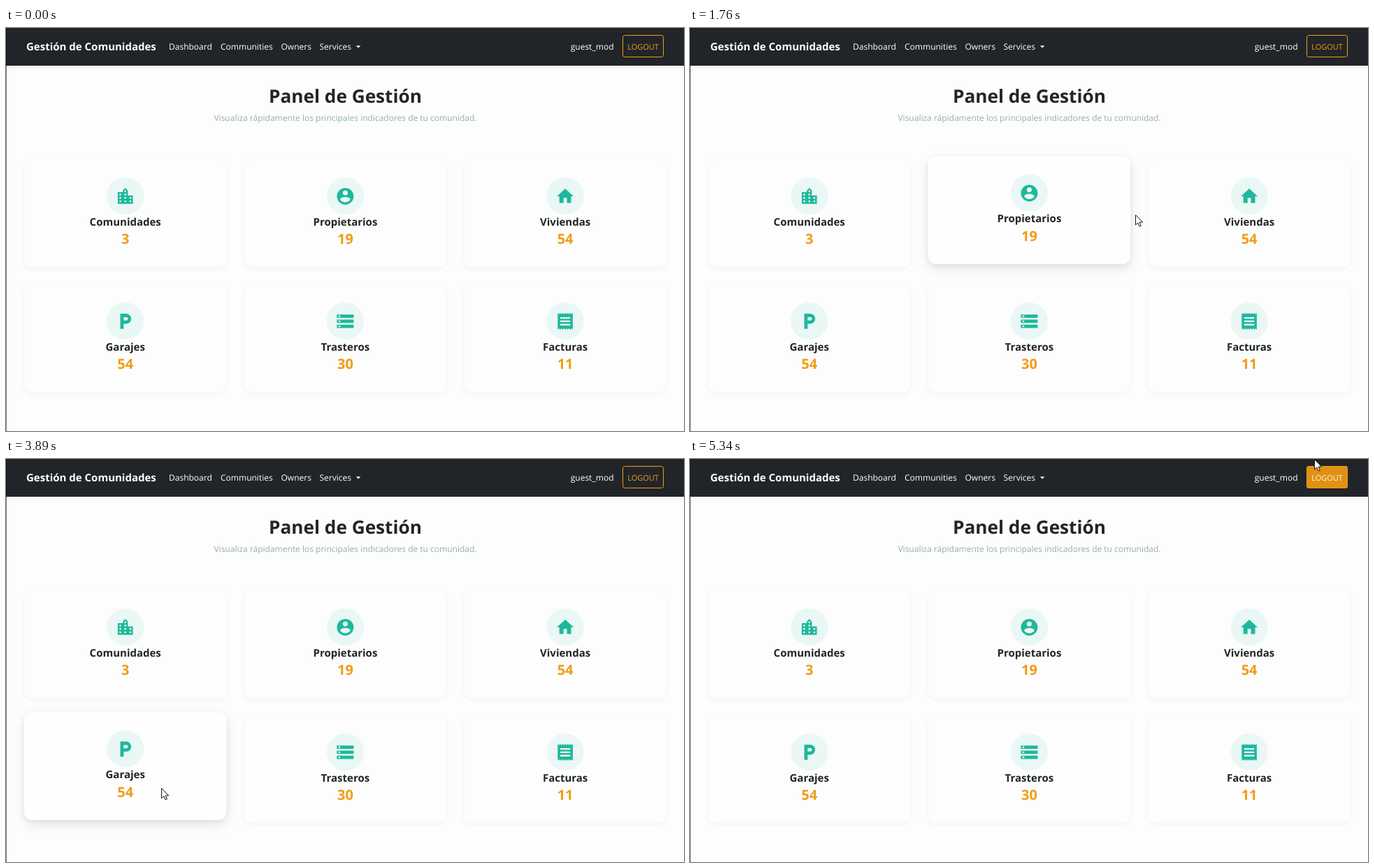
These frames come from a looping animation (970 px wide and 577 px high, 5.41 s). An HTML page:

```html
<!DOCTYPE html>
<html lang="es">
<head>
<meta charset="utf-8">
<title>Panel de Gestión</title>
<style>
  html, body { margin: 0; width: 100%; height: 100%; overflow: hidden; background: #fdfdfd; }
  svg { display: block; }
  text { font: 12px "Open Sans", "Noto Sans", sans-serif; text-rendering: geometricPrecision; }
  .nav { fill: #fff; }
  .bar { fill: #212529; filter: drop-shadow(0 1px 4px rgba(0,0,0,.1)); }
  .brand, .label { font-size: 15px; font-weight: 700; }
  .brand { fill: #fff; }
  .label, .title { fill: #212529; }
  .title { font-size: 26.2px; font-weight: 700; }
  .lead { fill: #95afb3; }
  .mid { text-anchor: middle; }
  .count { font-size: 20px; font-weight: 700; fill: #f19c16; }
  .logout { font-size: 11px; }
  .card { fill: #fdfdfd; filter: drop-shadow(0 2px 3px rgba(0,0,0,.045)); }
  .lift { fill: #fefefe; filter: drop-shadow(0 6px 8px rgba(0,0,0,.1)); }
  .disc { fill: #e9f7f5; }
  .icon { fill: #1fb89c; fill-rule: evenodd; }
  .pointer { fill: #fff; stroke: #111; stroke-linejoin: round; }
</style>
</head>
<body>
<svg width="970" height="577" viewBox="0 0 970 577">
  <rect width="970" height="577" fill="#fdfdfd"/>
  <rect class="bar" x="-10" y="-10" width="990" height="64"/>
  <rect width="1" height="54" fill="#111"/>
  <rect y="54" width="1" height="523" fill="#777"/>

  <text class="brand" x="29" y="32">Gestión de Comunidades</text>
  <g class="nav">
    <text x="233" y="31">Dashboard</text>
    <text x="307" y="31">Communities</text>
    <text x="393.5" y="31">Owners</text>
    <text x="448.5" y="31">Services</text>
    <path d="M500.8 25.2h6.6l-3.3 3.4z"/>
    <text x="869.5" y="31" text-anchor="end">guest_mod</text>
  </g>

  <rect x="882.5" y="10.5" width="58" height="31" rx="3" fill="none" stroke="#f39c12"/>
  <text class="logout mid" x="911.6" y="30.6" fill="#f39c12">LOGOUT</text>
  <g id="filled">
    <rect x="882" y="10" width="59" height="32" rx="3.5" fill="#f39c12"/>
    <text class="logout mid" x="911.6" y="30.6" fill="#fff">LOGOUT</text>
  </g>

  <text class="title mid" x="485.5" y="107">Panel de Gestión</text>
  <text class="lead mid" x="485.5" y="133">Visualiza rápidamente los principales indicadores de tu comunidad.</text>

  <g id="cards"></g>

  <g id="cursor">
    <path id="arrow" class="pointer" d="M.5 .7V15L3.8 11.9 6.1 17.1 8.3 16.1 6.1 11H10.6Z"/>
    <path id="hand" class="pointer" d="M0 1Q1.3-1 2.6 1V6L8.4 7.2Q10 7.6 9.9 9.2L9 16.5H1.2V14L-3.2 9.3Q-3.5 6-1.3 7.6L0 8.8Z"/>
    <path id="beam" class="pointer" d="M-3.5-7.5H-1L0-6.5 1-7.5H3.5M0-6.5V6.5M-3.5 7.5H-1L0 6.5 1 7.5H3.5" style="fill: none"/>
  </g>
</svg>
<script>
const LOOP = 5410, TICK = 70, FADE = 200, PAINT_LAG = 20, BUTTON = 6;
const $ = id => document.getElementById(id);

// icons on a 24-unit square
const box = (x, y, w, h) => `M${x} ${y}h${w}v${h}h${-w}z`;
const rows = (from, to, step, shape) => {
  let d = "";
  for (let y = from; y <= to; y += step) d += shape(y);
  return d;
};
const ring = (y, r) => `M12 ${y - r}a${r} ${r} 0 1 0 .01 0z`;
const city = "M15 11V5l-3-3-3 3v2H3v14h18V11z" +
  [9, 5, 13].map((top, i) => rows(top, 17, 4, y => box(5 + 6 * i, y, 2, 2))).join("");
const person = ring(12, 10) + ring(8, 3) + "M12 19.2Q8.2 19.1 6 16C6 12 18 12 18 16Q15.8 19.1 12 19.2z";
const house = "M10 20v-6h4v6h5v-8h3L12 3 2 12h3v8z";
const parking = "M13 3H6v18h4v-6h3a6 6 0 0 0 0-12zm.2 8H10V7h3.2a2 2 0 0 1 0 4z";
const storage = rows(4, 16, 6, y => box(2, y, 20, 4) + box(4, y + 1, 2, 2));
const receipt = "M3 22" + "l1.5-1.5 1.5 1.5".repeat(6) + "V2" + "l-1.5 1.5-1.5-1.5".repeat(6) + "z" +
  rows(7, 15, 4, y => box(6, y, 12, 2));

const CARDS = [
  ["Comunidades", 3, city], ["Propietarios", 19, person], ["Viviendas", 54, house],
  ["Garajes", 54, parking], ["Trasteros", 30, storage], ["Facturas", 11, receipt]
];

// time, x, y of the pointer at its turning points
const PATH = [
  [0, 240, 665], [790, 186, 372], [990, 181, 272], [1300, 260, 270], [1760, 637, 267],
  [2040, 800, 262], [2180, 764, 355], [2460, 733, 431], [3020, 334, 449], [3300, 215, 450],
  [3830, 215, 450], [4190, 300, 700], [4350, 656, 567], [4860, 882, 6],
  [4920, 895, 28], [5260, 895, 28], [5330, 893, 0], [LOOP, 893, 0]
];

const cardX = i => 170.7 + (i % 3) * 314.7;
const cardY = i => 240.5 + (i > 2 ? 179 : 0);

$("cards").innerHTML = CARDS.map(([label, count, icon]) => {
  const panel = name => `<rect class="${name}" x="-144.7" y="-52.5" width="289.4" height="154.5" rx="12"/>`;
  return `<g>${panel("card")}${panel("lift")}
    <circle class="disc" r="26.5"/>
    <path class="icon" transform="translate(-14.4 -14) scale(1.2)" d="${icon}"/>
    <text class="label mid" y="42.2">${label}</text>
    <text class="count mid" y="68.7">${count}</text></g>`;
}).join("");
const groups = [...$("cards").children];

function pointerAt(t) {
  const k = Math.max(1, PATH.findIndex(p => p[0] >= t));
  const [t0, x0, y0] = PATH[k - 1], [t1, x1, y1] = PATH[k];
  const p = (t - t0) / (t1 - t0);
  return [x0 + (x1 - x0) * p, y0 + (y1 - y0) * p];
}

// index of the card or button under the pointer, or -1
function hit([x, y]) {
  if (x > 882 && x < 941 && y > 10 && y < 42) return BUTTON;
  return CARDS.findIndex((c, i) =>
    Math.abs(x - cardX(i)) < 144.7 && Math.abs(y - cardY(i) - 24.7) < 77.2);
}

const overLabel = ([x, y]) => CARDS.some(([label], i) =>
  Math.abs(x - cardX(i)) < label.length * 4.4 && Math.abs(y - cardY(i) - 33) < 10);

// follow the pointer once to learn when it enters and leaves each target
const spans = [];
for (let t = 0, last = -1; t < LOOP; t++) {
  const i = hit(pointerAt(t));
  if (i !== last && i >= 0) spans.push({ i, on: t + PAINT_LAG });
  if (i >= 0) spans[spans.length - 1].off = t + PAINT_LAG;
  last = i;
}

const ease = p => 1 - (1 - Math.min(1, Math.max(0, p))) ** 3;

const hover = (t, i) => Math.max(0, ...spans.filter(s => s.i === i).map(({ on, off }) =>
  ease((Math.min(t, off) - on) / FADE) * (1 - ease((t - off) / FADE))));

const show = (id, on) => $(id).setAttribute("visibility", on ? "visible" : "hidden");

function draw(now) {
  const t = Math.max(0, Math.floor((now % LOOP - 10) / TICK) * TICK + 10);

  groups.forEach((g, i) => {
    const lift = hover(t, i);
    g.setAttribute("transform", `translate(${cardX(i)} ${cardY(i) - 4.5 * lift})`);
    g.children[1].setAttribute("opacity", lift);
  });
  $("filled").setAttribute("opacity", hover(t, BUTTON));

  const at = pointerAt(t);
  const hand = hit(at) === BUTTON, beam = overLabel(at);
  $("cursor").setAttribute("transform", `translate(${at})`);
  show("hand", hand);
  show("beam", beam);
  show("arrow", !hand && !beam);
  requestAnimationFrame(() => draw(performance.now() - start));
}

const start = performance.now();
draw(0);
</script>
</body>
</html>
```
